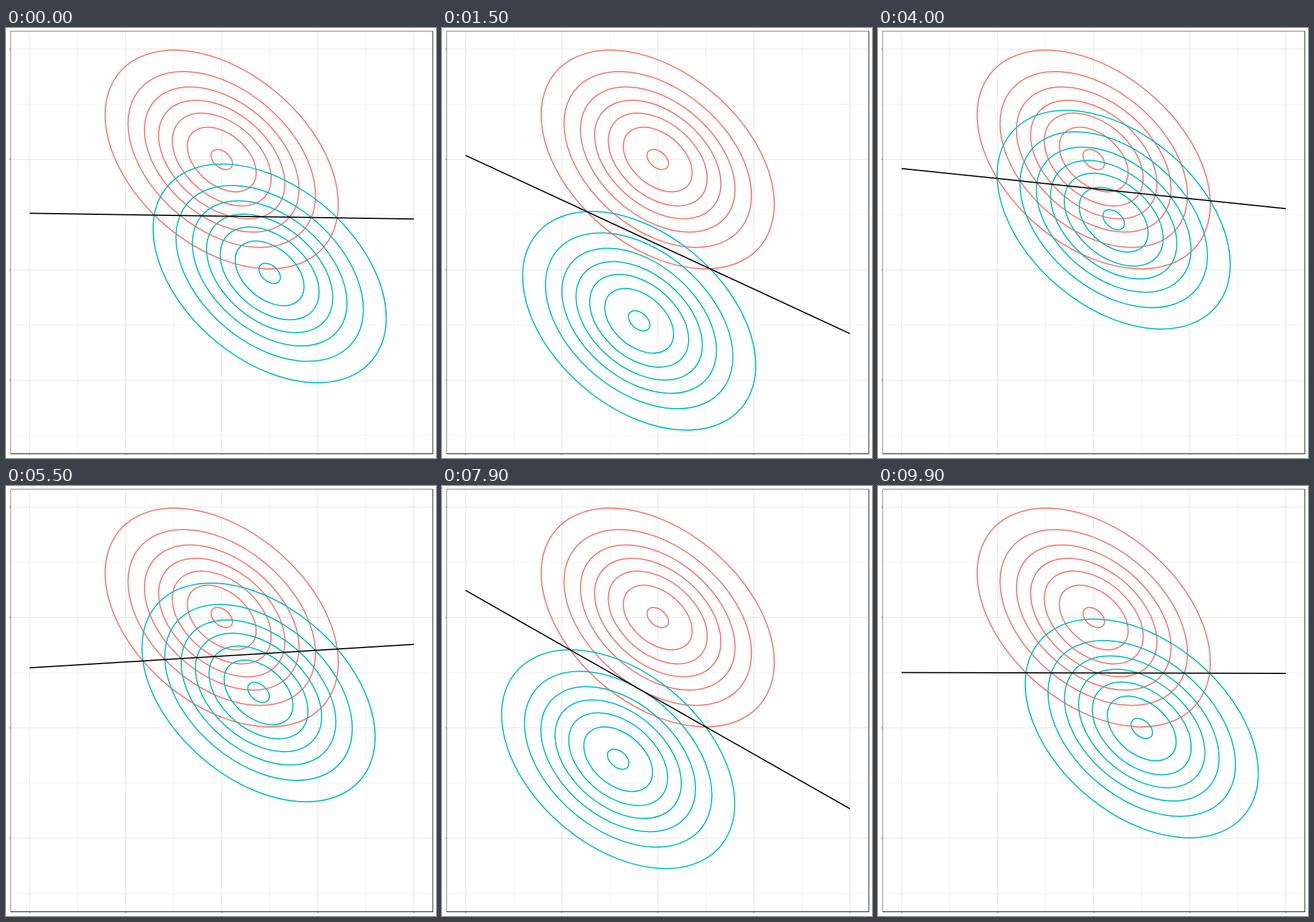
These frames come from a looping animation (748x748 px, 10000 ms). An HTML page:

```html
<!DOCTYPE html>
<html lang="en">
<head>
<meta charset="utf-8">
<title>Two Gaussians and their linear boundary</title>
<style>
  html, body { margin: 0; width: 100%; height: 100%; overflow: hidden; background: #fff; }
  svg { display: block; width: 100%; height: 100%; }
  circle { fill: none; stroke-width: 2; vector-effect: non-scaling-stroke; }
</style>
</head>
<body>
<svg id="stage" viewBox="0 0 748 748"></svg>
<script>
const stage = document.getElementById('stage');
const UNIT_X = 167.1, UNIT_Y = 192;
const toX = x => 375.3 + x * UNIT_X;
const toY = y => 420.8 - y * UNIT_Y;

// Shared covariance of both classes
const VAR_X = 0.375, COV = -0.125, VAR_Y = 0.25;
const DET = VAR_X * VAR_Y - COV * COV;
const LEVEL_STEP = 0.08;
const FRAME_MS = 100, FRAMES = 100;
const STEP = 2 * Math.PI / 99;

function add(parent, tag, attrs) {
  const node = document.createElementNS('http://www.w3.org/2000/svg', tag);
  for (const key in attrs) node.setAttribute(key, attrs[key]);
  return parent.appendChild(node);
}

function line(x1, y1, x2, y2, stroke, width = 1) {
  return add(stage, 'line', { x1, y1, x2, y2, stroke, 'stroke-width': width });
}

function drawGrid() {
  const left = 8, right = 743, top = 5.5, bottom = 740.5;
  const minor = '#eeeeee', major = '#dedede', tick = '#777777';
  for (let x = -1.5; x < 2; x++) line(toX(x), top, toX(x), bottom, minor);
  for (let y = -1.5; y < 2; y++) line(left, toY(y), right, toY(y), minor);
  for (let x = -2; x <= 2; x++) {
    line(toX(x), top, toX(x), bottom, major);
    line(toX(x), bottom, toX(x), bottom + 2.5, tick);
  }
  for (let y = -1; y <= 2; y++) {
    line(left, toY(y), right, toY(y), major);
    line(left - 2.5, toY(y), left, toY(y), tick);
  }
  return () => {
    add(stage, 'path', { d: `M${left} ${bottom}V${top}H${right}`, fill: 'none', stroke: '#6b6b6b' });
    add(stage, 'path', { d: `M${right - .5} ${top}V${bottom}H${left}`, fill: 'none', stroke: '#333333', 'stroke-width': 1.3 });
  };
}

// Density contours as unit circles mapped through the Cholesky factor
function drawContours(stroke) {
  const group = add(stage, 'g', { stroke });
  const peak = 1 / (2 * Math.PI * Math.sqrt(DET));
  const a = Math.sqrt(VAR_X), b = COV / a, c = Math.sqrt(VAR_Y - b * b);
  for (let level = LEVEL_STEP; level < peak; level += LEVEL_STEP) {
    const r = Math.sqrt(2 * Math.log(peak / level));
    const matrix = [a * r * UNIT_X, -b * r * UNIT_Y, 0, c * r * UNIT_Y, 0, 0];
    add(group, 'circle', { r: 1, transform: `matrix(${matrix})` });
  }
  return group;
}

function place(group, x, y) {
  group.setAttribute('transform', `translate(${toX(x)} ${toY(y)})`);
}

const drawBorder = drawGrid();
const fixedClass = drawContours('#F8766D');
const movingClass = drawContours('#00BFC4');
const boundary = line(0, 0, 0, 0, '#000', 2);
drawBorder();
place(fixedClass, 0, 1);

// Odd steps on the way out, even steps on the way back
function angleAt(frame) {
  const step = frame < FRAMES / 2 ? 2 * frame + 1 : 2 * (FRAMES - 1 - frame);
  return Math.max(0.01, step * STEP);
}

function render(time) {
  const angle = angleAt(Math.floor(time / FRAME_MS) % FRAMES);
  const x = 0.5 * Math.cos(angle), y = -0.5 * Math.sin(angle);
  place(movingClass, x, y);

  const dx = x, dy = y - 1;
  const slope = -(VAR_Y * dx - COV * dy) / (VAR_X * dy - COV * dx);
  const boundaryY = at => toY((y + 1) / 2 + slope * (at - x / 2));
  boundary.setAttribute('x1', toX(-2));
  boundary.setAttribute('y1', boundaryY(-2));
  boundary.setAttribute('x2', toX(2));
  boundary.setAttribute('y2', boundaryY(2));
}

const start = performance.now();
function tick() {
  render(performance.now() - start);
  requestAnimationFrame(tick);
}
tick();
</script>
</body>
</html>
```
